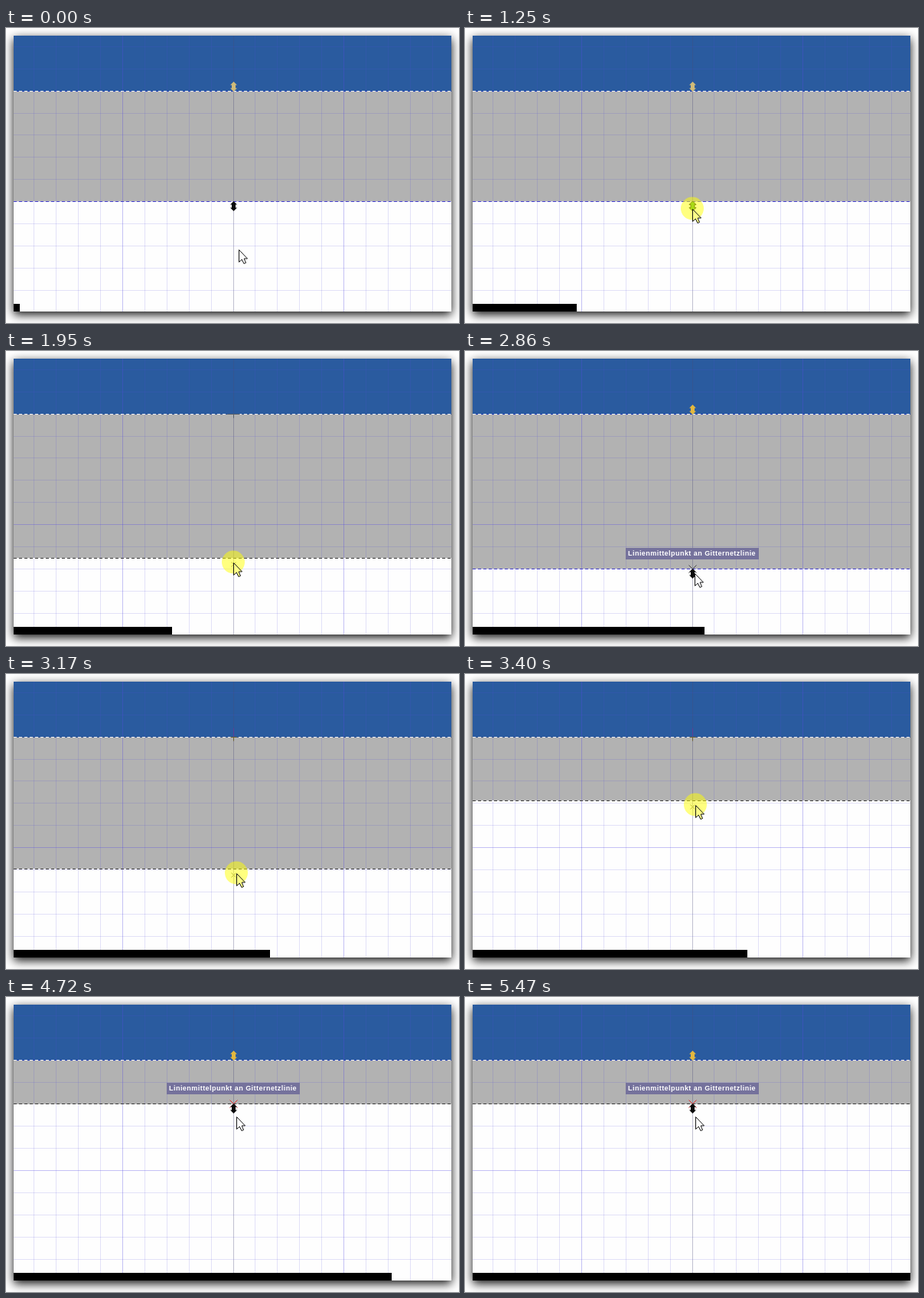
These frames come from a looping animation (592 px wide and 385 px high, 5.55 s). An HTML page with a canvas:

```html
<!DOCTYPE html>
<html lang="de">
<head>
<meta charset="utf-8">
<title>Linie am Gitter ausrichten</title>
<style>
  html, body { margin: 0; width: 100%; height: 100%; overflow: hidden; background: #fff; }
  canvas { display: block; }
</style>
</head>
<body>
<canvas id="stage" width="592" height="385"></canvas>
<script>
const ctx = document.getElementById('stage').getContext('2d');
const LOOP = 5550, STEP = 76.9, STEPS = 72;
const LEFT = 10, TOP = 10, WIDTH = 572, HEIGHT = 360;
const HEAD = 82, MID = 297, CELL = 28.9;

// Two drags of the lower edge, timed in steps
const drags = [
  { hover: 9, press: 13, start: 17, snap: 27, drop: 31, edge: 284 },
  { hover: 38, press: 38, start: 41, snap: 50, drop: 53, edge: 139 }
];

// Pointer tip: [step, x, y]
const pointer = [
  [0, 304, 289], [4, 347, 264], [9, 297, 236], [17, 297, 236], [27, 297, 286],
  [37, 300, 290], [40, 301, 289], [44, 301, 171], [50, 301, 156], [STEPS, 301, 156]
];

function pointerAt(step) {
  const i = pointer.findIndex(p => p[0] > step);
  const [s0, x0, y0] = pointer[i - 1], [s1, x1, y1] = pointer[i];
  const k = (step - s0) / (s1 - s0);
  return { x: Math.round(x0 + (x1 - x0) * k), y: Math.round(y0 + (y1 - y0) * k) };
}

function rect(x, y, w, h, color) {
  ctx.fillStyle = color;
  ctx.fillRect(x, y, w, h);
}

function line(x1, y1, x2, y2, color) {
  ctx.strokeStyle = color;
  ctx.lineWidth = 1;
  ctx.beginPath();
  ctx.moveTo(x1 + .5, y1 + .5);
  ctx.lineTo(x2 + .5, y2 + .5);
  ctx.stroke();
}

function cross(x, y, r, color) {
  line(x - r, y - r, x + r, y + r, color);
  line(x - r, y + r, x + r, y - r, color);
}

function shape(x, y, points, fill, stroke) {
  ctx.beginPath();
  for (const [px, py] of points) ctx.lineTo(x + px, y + py);
  ctx.closePath();
  ctx.fillStyle = fill;
  ctx.fill();
  if (stroke) {
    ctx.strokeStyle = stroke;
    ctx.lineWidth = 1;
    ctx.stroke();
  }
}

function card() {
  rect(0, 0, 592, 385, '#fff');
  ctx.save();
  ctx.shadowColor = 'rgba(0,0,0,.95)';
  ctx.shadowBlur = 12;
  ctx.shadowOffsetY = 4;
  rect(LEFT, TOP, WIDTH, HEIGHT, '#fefefe');
  ctx.restore();
}

function grid() {
  const minor = 'rgba(85,75,215,.16)', major = 'rgba(85,75,225,.34)';
  for (let k = -4; k <= 14; k++) {
    const color = k === 5 ? 'rgba(75,75,120,.34)' : k % 5 ? minor : major;
    rect(Math.floor(152.55 + CELL * k), TOP, 1, HEIGHT, color);
  }
  for (let k = -7; k <= 4; k++) {
    rect(LEFT, Math.round(226.15 + CELL * k), WIDTH, 1, k ? minor : major);
  }
}

function dashes(y, base, color) {
  rect(LEFT, y, WIDTH, 1, base);
  for (let x = 0; x < WIDTH; x += 7) rect(LEFT + x, y, Math.min(4, WIDTH - x), 1, color);
}

const half = [[0, -6.5], [4.5, -2], [2.5, -2], [2.5, 2], [4.5, 2], [0, 6.5]];
const arrows = [...half, ...half.slice(1, 5).map(([x, y]) => [-x, -y])];
const handle = (y, fill, stroke) => shape(MID + .5, y, arrows, fill, stroke);

const tip = [[0, 0], [0, 16], [3.8, 12.6], [6.4, 18], [9, 17], [6.6, 11.5], [11, 11.5]];

function tooltip(y) {
  rect(210, y, 174, 15, '#75729c');
  ctx.font = 'bold 9px "Liberation Sans", Arial, sans-serif';
  ctx.letterSpacing = '.46px';
  ctx.fillStyle = '#fff';
  ctx.fillText('Linienmittelpunkt an Gitternetzlinie', 213, y + 10);
}

function dragMarks(edge, snapped, second) {
  cross(MID, edge + 8, 3, snapped ? '#e02b2b' : '#8d8d70');
  const color = second ? '#6d6134' : '#59616b', r = second ? 4 : 8;
  if (second) line(MID, 70, MID, HEAD, '#5f3d93');
  line(MID - r, HEAD, MID + r, HEAD, color);
  line(MID, HEAD, MID, HEAD + 5, color);
}

function draw(step) {
  const second = step >= drags[1].start;
  const active = drags.find(d => step >= d.hover && step < d.drop);
  const pressed = active && step >= active.press;
  const dragging = active && step >= active.start;
  const hover = active && !dragging;
  const last = drags[second ? 1 : 0];
  const snapped = step >= last.snap;
  const { x, y } = pointerAt(step);
  const edge = snapped ? last.edge : step < drags[0].start ? 226 : y - 6;

  card();
  rect(LEFT, TOP, WIDTH, HEAD - TOP, '#2a5b9f');
  rect(LEFT, HEAD, WIDTH, edge - HEAD, '#b2b2b2');
  grid();

  dashes(HEAD, dragging ? '#3c5a92' : '#2b46bd', '#f0f0f4');
  if (!dragging && !second) dashes(edge, '#cfcdf0', '#4540cf');
  else dashes(edge, snapped ? '#bbb' : '#f4f4f4', '#3c3c3c');

  if (snapped) {
    tooltip(edge - 27);
    cross(MID, edge, 5, dragging || second ? '#e02b2b' : '#444');
  }
  if (dragging) {
    dragMarks(edge, snapped, second);
  } else {
    handle(76.5, step < drags[0].start ? '#d0bb78' : '#e3b83e');
    handle(edge + 6.5, hover ? '#55b72c' : '#0a0a0a', hover && '#1c3512');
  }

  if (pressed) {
    ctx.fillStyle = 'rgba(255,255,0,.5)';
    ctx.beginPath();
    ctx.arc(x, y - .5, 15, 0, Math.PI * 2);
    ctx.fill();
  }
  shape(x + .5, y + .5, tip, pressed ? '#ffff88' : '#fff', '#161616');

  const done = Math.ceil((WIDTH + 1) * (step + 1) / STEPS);
  rect(LEFT, 360, Math.min(WIDTH, done), 10, '#000');
}

function tick() {
  const t = performance.now() % LOOP;
  draw(Math.min(STEPS - 1, Math.floor(t / STEP)));
  requestAnimationFrame(tick);
}
tick();
</script>
</body>
</html>
```
